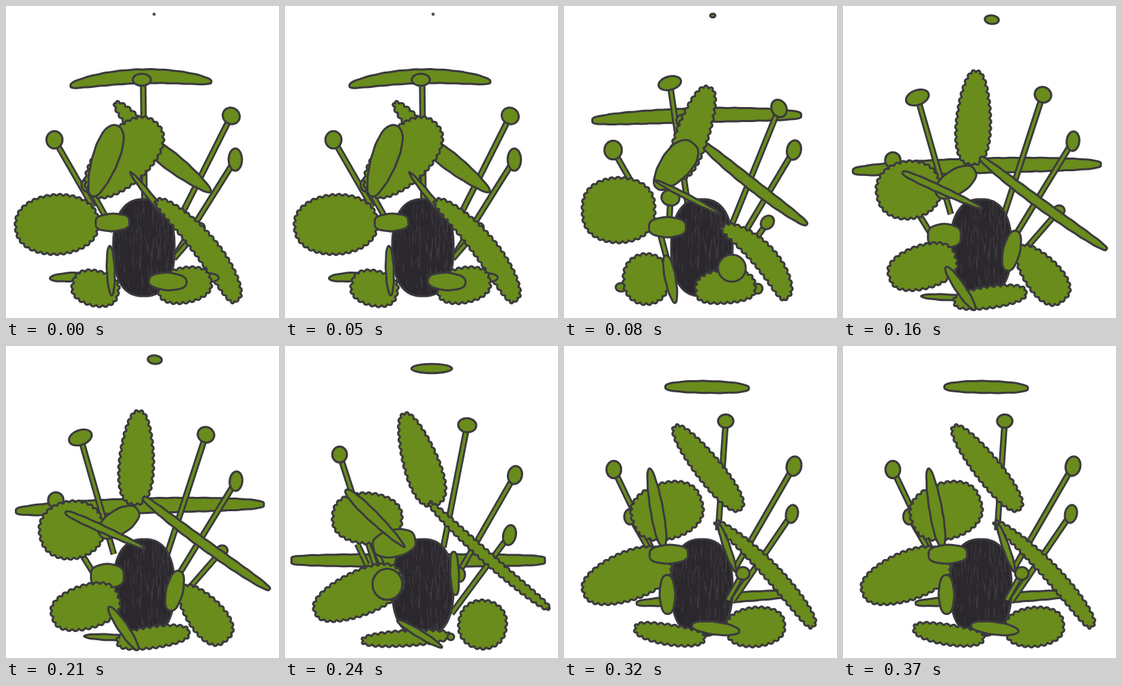
These frames come from a looping animation (400 px wide and 457 px high, 400 ms). An HTML page with a canvas:

```html
<!DOCTYPE html>
<html lang="en">
<head>
<meta charset="utf-8">
<title>Marker creature</title>
<style>
  html, body { margin: 0; width: 100%; height: 100%; overflow: hidden; background: #fff; }
  canvas { display: block; }
</style>
</head>
<body>
<canvas id="stage" width="400" height="457"></canvas>
<script>
const ctx = document.getElementById('stage').getContext('2d');
const GREEN = '#698c1c', INK = '#3b393e', BODY = '#2b282d';
const STEP = 80, INSET = 1.5;

function paint(fill = GREEN) {
  ctx.fillStyle = fill;
  ctx.strokeStyle = INK;
  ctx.lineWidth = 3;
  ctx.fill();
  ctx.stroke();
}

// Closed outline around a bent spine; a taper above 0 widens the far end.
function outline(x1, y1, x2, y2, width, taper, bend, power, bump) {
  const count = 400, dx = x2 - x1, dy = y2 - y1, len = Math.hypot(dx, dy);
  const points = [];
  for (let i = 0; i < count; i++) {
    const t = i / count * 2 * Math.PI, c = Math.cos(t), s = Math.sin(t);
    const along = (1 - c) / 2;
    const side = width / 2 * Math.sign(s) * Math.abs(s) ** power * (1 - taper * c) + bend * s * s;
    points.push([x1 + dx * along - dy / len * side, y1 + dy * along + dx / len * side]);
  }
  const at = i => points[(i + count) % count];
  const lengths = points.map((p, i) => Math.hypot(p[0] - at(i + 1)[0], p[1] - at(i + 1)[1]));
  const total = lengths.reduce((a, b) => a + b);
  const bumps = Math.round(total / (bump || 23));
  let run = 0;
  ctx.beginPath();
  points.forEach(([x, y], i) => {
    const [ax, ay] = at(i - 1), [bx, by] = at(i + 1);
    const d = Math.hypot(bx - ax, by - ay) || 1;
    const wave = Math.sin(Math.PI * bumps * run / total);
    const out = bump ? 3 * Math.abs(wave) - 3.8 : 0.4 * wave * wave - INSET;
    ctx.lineTo(x - (by - ay) / d * out, y + (bx - ax) / d * out);
    run += lengths[i];
  });
  ctx.closePath();
  paint();
}

const leaf = (x1, y1, x2, y2, w, taper = 0, bend = 0, power = 0.85) =>
  outline(x1, y1, x2, y2, w, taper, bend, power, 0);
const fuzzy = (x1, y1, x2, y2, w, taper = 0, bend = 0, power = 0.85) =>
  outline(x1, y1, x2, y2, w, taper, bend, power, 10);

function knob(x, y, w, h, turn = 0) {
  ctx.beginPath();
  ctx.ellipse(x, y, w / 2 - INSET + 0.8, h / 2 - INSET + 0.8, turn, 0, 7);
  paint();
}

function stem(x1, y1, x2, y2) {
  for (const [color, width] of [[INK, 9.5], [GREEN, 4]]) {
    ctx.strokeStyle = color;
    ctx.lineWidth = width;
    ctx.beginPath();
    ctx.moveTo(x1, y1);
    ctx.lineTo(x2, y2);
    ctx.stroke();
  }
}

function pin(x, y, w, h, x2, y2, turn) {
  stem(x, y, x2, y2);
  knob(x, y, w, h, turn);
}

// Dark body with pencil hatching.
function body() {
  ctx.save();
  ctx.beginPath();
  for (let i = 0; i < 120; i++) {
    const t = i / 60 * Math.PI, c = Math.cos(t), s = Math.sin(t);
    ctx.lineTo(202 + 45 * Math.sign(c) * Math.abs(c) ** 0.8, 354 + 71 * Math.sign(s) * Math.abs(s) ** 0.85);
  }
  ctx.closePath();
  paint(BODY);
  ctx.clip();
  ctx.strokeStyle = 'rgba(120,115,125,.3)';
  ctx.lineWidth = 0.7;
  let seed = 7;
  const random = () => (seed = seed * 16807 % 2147483647) / 2147483647;
  ctx.beginPath();
  for (let i = 0; i < 170; i++) {
    const x = 155 + random() * 94, y = 280 + random() * 140;
    ctx.moveTo(x, y);
    ctx.lineTo(x + random() * 4 - 2, y + 6 + random() * 16);
  }
  ctx.stroke();
  ctx.restore();
}

const poses = [
  () => {
    knob(217, 12, 3, 3);
    stem(201, 112, 203, 290);
    leaf(93, 117, 302, 111, 23, 0, -11, 0.65);
    knob(199, 108, 28, 19);
    fuzzy(159, 140, 222, 208, 26);
    pin(71, 196, 25, 27, 128, 295);
    pin(120, 262, 20, 22, 158, 330);
    pin(330, 161, 27, 25, 255, 310, 0.6);
    pin(336, 225, 21, 34, 245, 370);
    pin(285, 325, 14, 16, 246, 370);
    leaf(200, 195, 301, 273, 28, -0.25);
    fuzzy(122, 276, 222, 170, 80, 0.1);
    leaf(126, 280, 163, 174, 40, 0.2);
    body();
    leaf(181, 242, 246, 322, 11);
    fuzzy(220, 283, 340, 433, 39, 0.15, -12, 0.6);
    fuzzy(12, 324, 137, 316, 91);
    leaf(130, 318, 182, 316, 28, 0, 0, 0.65);
    leaf(63, 399, 125, 395, 15);
    fuzzy(96, 405, 166, 422, 55, 0, 0, 0.7);
    leaf(152, 350, 155, 425, 14);
    leaf(270, 398, 313, 398, 16);
    fuzzy(221, 417, 302, 401, 55, 0, 0, 0.7);
    leaf(208, 402, 266, 405, 28);
  },
  () => {
    knob(218, 14, 9, 7);
    leaf(40, 168, 349, 160, 23, 0, -4, 0.5);
    pin(155, 113, 35, 21, 182, 295, -0.25);
    pin(173, 168, 18, 19, 182, 205);
    pin(315, 150, 23, 28, 244, 325, -0.5);
    pin(337, 211, 22, 30, 266, 330, 0.2);
    pin(298, 317, 19, 23, 275, 350, 0.7);
    pin(72, 211, 27, 29, 100, 260);
    leaf(198, 197, 357, 321, 19, 0, 3, 0.6);
    fuzzy(213, 117, 165, 254, 51, 0.1, 0, 0.7);
    leaf(135, 268, 190, 200, 46, 0.2);
    stem(140, 330, 152, 375);
    body();
    pin(156, 281, 28, 24, 154, 320, 0.2);
    leaf(131, 254, 230, 305, 10);
    fuzzy(25, 300, 135, 298, 99, 0, 0, 0.75);
    leaf(123, 324, 180, 324, 32, 0, 0, 0.75);
    fuzzy(232, 321, 329, 429, 39, 0.1, -14, 0.6);
    knob(84, 412, 18, 14);
    fuzzy(85, 400, 156, 400, 78);
    leaf(149, 364, 163, 436, 18, -0.1);
    knob(284, 414, 15, 16);
    fuzzy(191, 417, 282, 410, 53, 0, -3, 0.65);
    knob(246, 384, 42, 41);
  },
  () => {
    knob(218, 20, 22, 14, 0.1);
    leaf(13, 242, 379, 232, 24, 0, -3, 0.5);
    pin(109, 134, 36, 23, 158, 305, -0.35);
    pin(293, 130, 26, 24, 236, 305, 0.4);
    pin(337, 198, 20, 30, 250, 340, 0.1);
    pin(316, 300, 19, 17, 262, 362, -0.4);
    knob(73, 226, 24, 25);
    stem(108, 300, 134, 342);
    fuzzy(195, 93, 188, 234, 53, 0.2, 0, 0.75);
    leaf(200, 221, 387, 357, 17, 0, 3, 0.5);
    fuzzy(48, 279, 144, 260, 88);
    body();
    leaf(136, 277, 194, 239, 38);
    leaf(86, 243, 205, 297, 13, -0.2, 0, 0.6);
    leaf(123, 337, 174, 337, 38, 0, 0, 0.7);
    fuzzy(257, 352, 324, 433, 56, 0.2, 0, 0.75);
    leaf(240, 389, 254, 328, 27);
    fuzzy(66, 398, 167, 367, 67, 0.05, 0, 0.7);
    leaf(113, 425, 185, 428, 11);
    fuzzy(161, 434, 270, 419, 35, 0, 0, 0.65);
    leaf(150, 381, 194, 446, 17);
  },
  () => {
    knob(215, 33, 61, 15);
    leaf(8, 314, 382, 314, 21, 0, 0, 0.3);
    pin(267, 116, 28, 22, 232, 295, 0.1);
    pin(80, 159, 23, 25, 132, 320);
    stem(106, 290, 120, 320);
    stem(128, 290, 142, 320);
    pin(337, 189, 22, 28, 256, 330, 0.2);
    pin(329, 277, 20, 31, 244, 392, 0.2);
    knob(256, 335, 17, 22);
    fuzzy(174, 97, 221, 235, 54, 0.25, 0, 0.75);
    fuzzy(210, 228, 388, 386, 20, 0.05, 4, 0.5);
    fuzzy(68, 249, 173, 256, 78, 0, 0, 0.75);
    body();
    leaf(128, 296, 192, 282, 42, 0, 0, 0.75);
    leaf(88, 210, 176, 295, 18, -0.25);
    fuzzy(42, 391, 173, 335, 68, 0.1, 0, 0.75);
    knob(150, 349, 45, 47);
    leaf(247, 300, 250, 366, 15, 0, 0, 0.65);
    fuzzy(253, 404, 326, 412, 75);
    fuzzy(111, 432, 243, 424, 26, 0, 0, 0.65);
    knob(243, 426, 11, 11);
    leaf(163, 401, 231, 442, 13);
  },
  () => {
    leaf(147, 60, 272, 62, 20, 0, -1, 0.65);
    leaf(105, 377, 345, 362, 17, 0, 0, 0.5);
    stem(237, 110, 226, 270);
    knob(237, 110, 24, 21);
    pin(73, 181, 23, 27, 130, 300);
    pin(97, 250, 19, 24, 126, 300);
    pin(337, 176, 23, 30, 248, 330, 0.2);
    pin(334, 246, 19, 28, 246, 375, 0.2);
    fuzzy(161, 116, 260, 241, 42, 0.1, 0, 0.75);
    fuzzy(221, 256, 367, 412, 28, 0.2, -9, 0.55);
    fuzzy(99, 258, 203, 225, 86, 0, 0, 0.75);
    body();
    leaf(226, 259, 252, 332, 12);
    pin(262, 333, 21, 20, 240, 372);
    fuzzy(27, 363, 156, 313, 74, 0.1, 0, 0.75);
    leaf(125, 178, 146, 297, 21, 0.1);
    leaf(124, 306, 183, 304, 30, 0, 0, 0.7);
    leaf(151, 334, 152, 394, 25);
    fuzzy(102, 413, 208, 429, 33, 0, 2, 0.65);
    fuzzy(236, 416, 325, 407, 61, 0, 0, 0.75);
    leaf(186, 409, 258, 418, 21);
  }
];

function draw() {
  const pose = Math.floor(performance.now() / STEP) % poses.length;
  ctx.fillStyle = '#fff';
  ctx.fillRect(0, 0, 400, 457);
  ctx.lineJoin = 'round';
  poses[pose]();
  requestAnimationFrame(draw);
}
draw();
</script>
</body>
</html>
```
